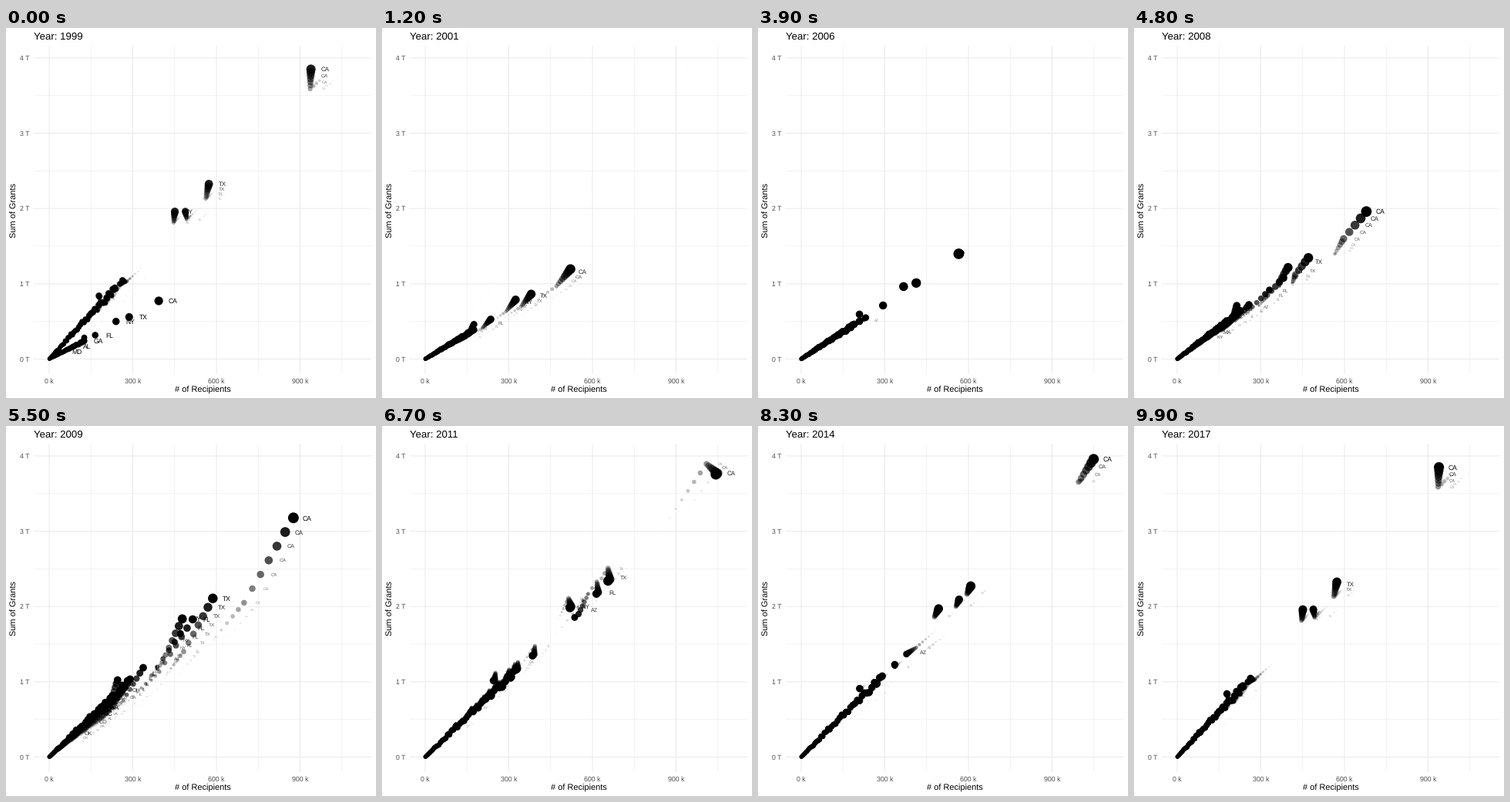
Recreate the animation shown at these times as a matplotlib script. Size 480 by 480 pixels, loop 10000 ms.

```python
import numpy as np
import matplotlib.pyplot as plt
from matplotlib.animation import FuncAnimation

plt.rcParams["font.family"] = "Liberation Sans"
plt.rcParams["text.hinting"] = "none"

FRAMES, STEP, WAKE = 100, 100, 15
YEARS = np.arange(1999, 2018)
KEYS = np.round(1 + 5.5 * np.arange(len(YEARS))) - 1
NUDGE, LABEL = 50, 8.5

# Turning points of the largest state: year, thousand recipients, grants
TREND = np.array([
    (1999, 393, .773), (2000, 471, .968), (2002, 557, 1.357),
    (2004, 583, 1.423), (2006, 565, 1.398), (2007, 597, 1.598),
    (2008, 699, 2.05), (2009, 876, 3.178), (2010, 1009, 3.895),
    (2011, 1048, 3.769), (2013, 995, 3.656), (2014, 1049, 3.958),
    (2016, 936, 3.591), (2017, 939, 3.851)])

# Size relative to the largest state at the anchor years, then steepness
ANCHORS = [1999, 2006, 2010, 2014, 2017]
LARGE = {
    "CA": ([1, 1, 1, 1, 1], 1),
    "TX": ([.73, .73, .65, .58, .61], .99),
    "NY": ([.61, .65, .51, .47, .48], 1.06),
    "FL": ([.42, .52, .61, .54, .52], .98),
    "AZ": ([.22, .41, .58, .36, .27], .96),
    "IL": ([.32, .37, .39, .32, .28], .97),
    "PR": ([.32, .37, .25, .2, .19], 1.15),
}
# The rest, from large to small, share one drift
REST = ("GA OH MI PA NC IN NJ VA TN MO AL MN WA MA LA SC CO KY WI MS IA MD OR "
        "UT OK AR NM KS CT WV ID NV NE RI ME DC NH MT HI SD DE ND VT AK WY GU").split()
DRIFT = np.array([.97, 1.02, 1, .84, .76])

rng = np.random.RandomState(4)
states = dict(LARGE)
for rank, name in enumerate(REST):
    size = .33 * (1 - rank / len(REST)) ** 1.5
    states[name] = size * DRIFT, .98 + .03 * rng.randn()
STATES = sorted(states)

frame = np.arange(FRAMES)
base_k, base_t = (np.interp(YEARS, TREND[:, 0], TREND[:, c]) for c in (1, 2))
growth = np.interp(frame, [0, 17, 60, 99], [.8, .95, 1, .94])


def track(ratios, slope):
    """Recipients, grants and dot radius of one state in every frame."""
    ratio = np.interp(YEARS, ANCHORS, ratios)
    k = np.interp(frame, KEYS, base_k * ratio)
    t = np.interp(frame, KEYS, base_t * ratio * slope)
    return k, t, growth * (2.8 + 4.2 * ratios[0] ** .6)


X, Y, R = np.array([track(*states[s]) for s in STATES]).transpose(1, 2, 0)

fig = plt.figure(figsize=(480 / 72, 480 / 72), dpi=72, facecolor="white")
ax = fig.add_axes([36 / 480, 31 / 480, 438 / 480, 426 / 480])
ax.set_xlim(-55.3, 1155.7)
ax.set_ylim(-.2, 4.163)
ax.axis("off")
PX, PY = 438 / 1211, 426 / 4.363  # pixels per data unit

for n in range(9):
    style = dict(color="#EBEBEB", lw=.55 if n % 2 else 1.07, zorder=0, snap=False)
    ax.axhline(n / 2, **style)
    if n < 8:
        ax.axvline(n * 150, **style)


def write(x, y, s, size, **kw):
    return fig.text(x / 480, 1 - y / 480, s, fontsize=size, **kw)


for n in range(5):
    write(31, 432.5 - 97.65 * n, f"{n} T", 8.8, color="#4D4D4D", ha="right")
    if n < 4:
        write(56 + 108.5 * n, 461, f"{300 * n} k", 8.8, color="#4D4D4D", ha="center")
write(255, 473, "# of Recipients", 11, ha="center")
write(11, 236.5, "Sum of Grants", 11, ha="center", va="center", rotation=90)
title = write(36, 15, "", 13.2)

dots = ax.scatter([], [], linewidths=0, zorder=2)
labels = []


def place_labels(frames, scale, alpha):
    """Put labels down oldest first and skip those that would overlap."""
    boxes = np.empty((0, 4))
    for f, s, a in zip(frames, scale, alpha):
        size = LABEL * s
        hw, hh = .69 * size, .4 * size
        for n, state in enumerate(STATES):
            x, y = X[f, n] + NUDGE, Y[f, n]
            px, py = x * PX, y * PY
            hit = ((abs(boxes[:, 0] - px) < boxes[:, 2] + hw)
                   & (abs(boxes[:, 1] - py) < boxes[:, 3] + hh))
            if hit.any():
                continue
            boxes = np.vstack([boxes, (px, py, hw, hh)])
            if size > 1:
                labels.append(ax.text(
                    x, y, state, fontsize=size, alpha=a,
                    ha="center", va="center_baseline", zorder=3))


def draw(i):
    title.set_text(f"Year: {round(1999 + 18 * i / 99)}")
    age = np.arange(WAKE, -1, -1)
    frames = (i - age) % FRAMES
    fade = 1 - age / (WAKE + 1)
    scale, alpha = fade ** 1.3, fade ** 1.8

    dots.set_offsets(np.column_stack([X[frames].ravel(), Y[frames].ravel()]))
    dots.set_sizes((2 * R[frames] * scale[:, None]).ravel() ** 2)
    rgba = np.zeros((len(frames) * len(STATES), 4))
    rgba[:, 3] = np.repeat(alpha, len(STATES))
    dots.set_facecolors(rgba)

    for label in labels:
        label.remove()
    labels.clear()
    place_labels(frames, scale, alpha)
    return [dots, title]


anim = FuncAnimation(fig, draw, frames=FRAMES, interval=STEP,
                     repeat=True, repeat_delay=0, blit=False)
plt.show()
```
